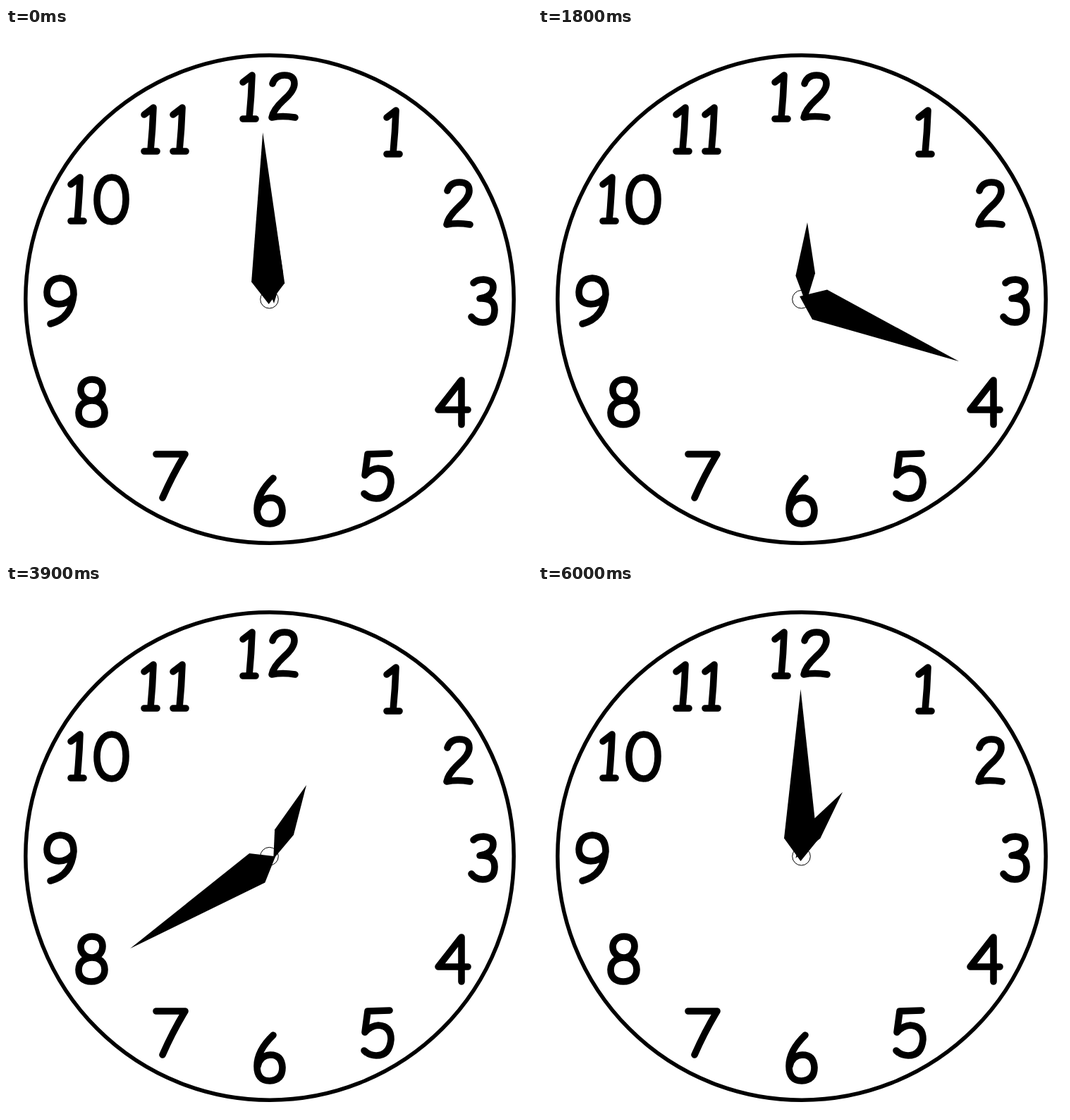
Write an HTML page that moves like this. It is 746 px wide and 751 px high and loops after 6100 ms.

```html
<!DOCTYPE html>
<html lang="en">
<head>
<meta charset="utf-8">
<title>Clock</title>
<style>
  html, body { margin: 0; width: 100%; height: 100%; overflow: hidden; background: #fff; }
  svg { display: block; width: 100%; height: 100%; }
</style>
</head>
<body>
<svg viewBox="0 0 746 751" role="img" aria-label="Clock face with the numbers 1 to 12">
  <circle cx="374" cy="385" r="346.2" fill="#fff" stroke="#000" stroke-width="5.5"/>
  <g id="numerals" fill="none" stroke="#000" stroke-width="9.6" stroke-linecap="round" stroke-linejoin="round"/>
  <circle cx="373.5" cy="385.2" r="12.8" fill="none" stroke="#000"/>
  <polygon id="hour"/>
  <polygon id="minute"/>
</svg>
<script>
const STEP = 100, STEPS = 61, DIGIT_ADVANCE = 41;

// Handwritten digits as pen strokes, from the top left of each digit.
const digits = [
  'M22 5C35 5 42 18 42 36S35 68 22 68S1 55 1 37S9 5 22 5Z',
  'M5 15L18 5Q17 35 14 66M5 67H23',
  'M6 17Q10 5 23 5Q37 5 37 17Q37 27 22 40Q7 54 5 65Q20 62 38 65',
  'M8 10Q13 5 22 5Q36 6 36 16Q36 29 17 32Q38 31 38 48Q38 66 21 66Q11 66 5 58',
  'M38 5V68M37 6L5 47H47',
  'M41 5L10 6L6 36Q14 27 25 26Q43 27 43 46Q41 69 22 69Q12 69 5 62',
  'M28 5Q5 27 5 49Q5 70 23 70Q41 69 41 51Q40 33 24 33Q9 34 6 49',
  'M5 5H46Q28 35 14 67',
  'M24 5C34 5 39 11 39 19S33 35 24 35S8 28 8 20S14 5 24 5ZM24 35C35 35 42 42 42 52S35 69 23 69S5 62 5 52S13 35 24 35Z',
  'M42 32Q34 42 22 42Q5 41 5 25Q6 6 24 5Q43 6 43 28Q40 62 10 70'
];

// Top left of the numerals 1 to 12, which are set by hand around the rim.
const corners = [
  [535, 112], [620, 214], [655, 352], [608, 495], [503, 599], [351, 634],
  [208, 600], [98, 494], [53, 350], [87, 207], [191, 108], [331, 62]
];

document.getElementById('numerals').innerHTML = corners.map(([x, y], i) =>
  [...String(i + 1)].map((digit, place) =>
    `<path d="${digits[digit]}" transform="translate(${x + place * DIGIT_ADVANCE} ${y})"/>`).join('')
).join('');

// Hand outlines as [along, across] points measured from the tip.
const minuteShape = [[0, 0], [-215, 23.5], [-244, 0], [-211.5, -23.5]];
const hourShape = [[0, 0], [-72, 12.3], [-115, 0], [-76, -15.3]];

// The minute hand runs close to six degrees a step, with two short rests.
const minuteTurn = [
  [0, -2], [7, 48.5], [14, 88], [23, 142.5], [28, 166.6], [39, 237.6], [42, 251.7],
  [48, 291.6], [52, 323], [53, 323], [56, 337.4], [57, 337.4], [60, 360]
];
const pivot = [375.5, 386];

// The hour hand jumps: step, tip x, tip y, angle clockwise from twelve.
const hourJumps = [
  [0, 382, 276, 1], [30, 403, 281, 15], [37, 426, 284, 24],
  [41, 422, 289, 24.5], [60, 432, 294, 35.4]
];

function offset([x, y], angle, along, across) {
  const r = angle * Math.PI / 180, s = Math.sin(r), c = Math.cos(r);
  return [x + along * s + across * c, y - along * c + across * s];
}

const lastKey = (keys, step) => keys.findLastIndex(key => key[0] <= step);

function turnAt(step) {
  const i = lastKey(minuteTurn, step);
  const [from, a] = minuteTurn[i];
  const [to, b] = minuteTurn[i + 1] || [from + 1, a];
  return a + (b - a) * (step - from) / (to - from);
}

function drawHand(id, shape, tip, angle) {
  const points = shape.map(([along, across]) =>
    offset(tip, angle, along, across).map(v => v.toFixed(2)).join());
  document.getElementById(id).setAttribute('points', points.join(' '));
}

function draw(time) {
  const step = Math.floor(time / STEP) % STEPS;
  const [, x, y, hourAngle] = hourJumps[lastKey(hourJumps, step)];
  drawHand('hour', hourShape, [x, y], hourAngle);

  // The hand turns about a point slightly off its own axis.
  const angle = turnAt(step);
  drawHand('minute', minuteShape, offset(pivot, angle, 238, -3), angle);
}

let start;
function tick(now) {
  start ??= now;
  draw(now - start);
  requestAnimationFrame(tick);
}
draw(0);
requestAnimationFrame(tick);
</script>
</body>
</html>
```
